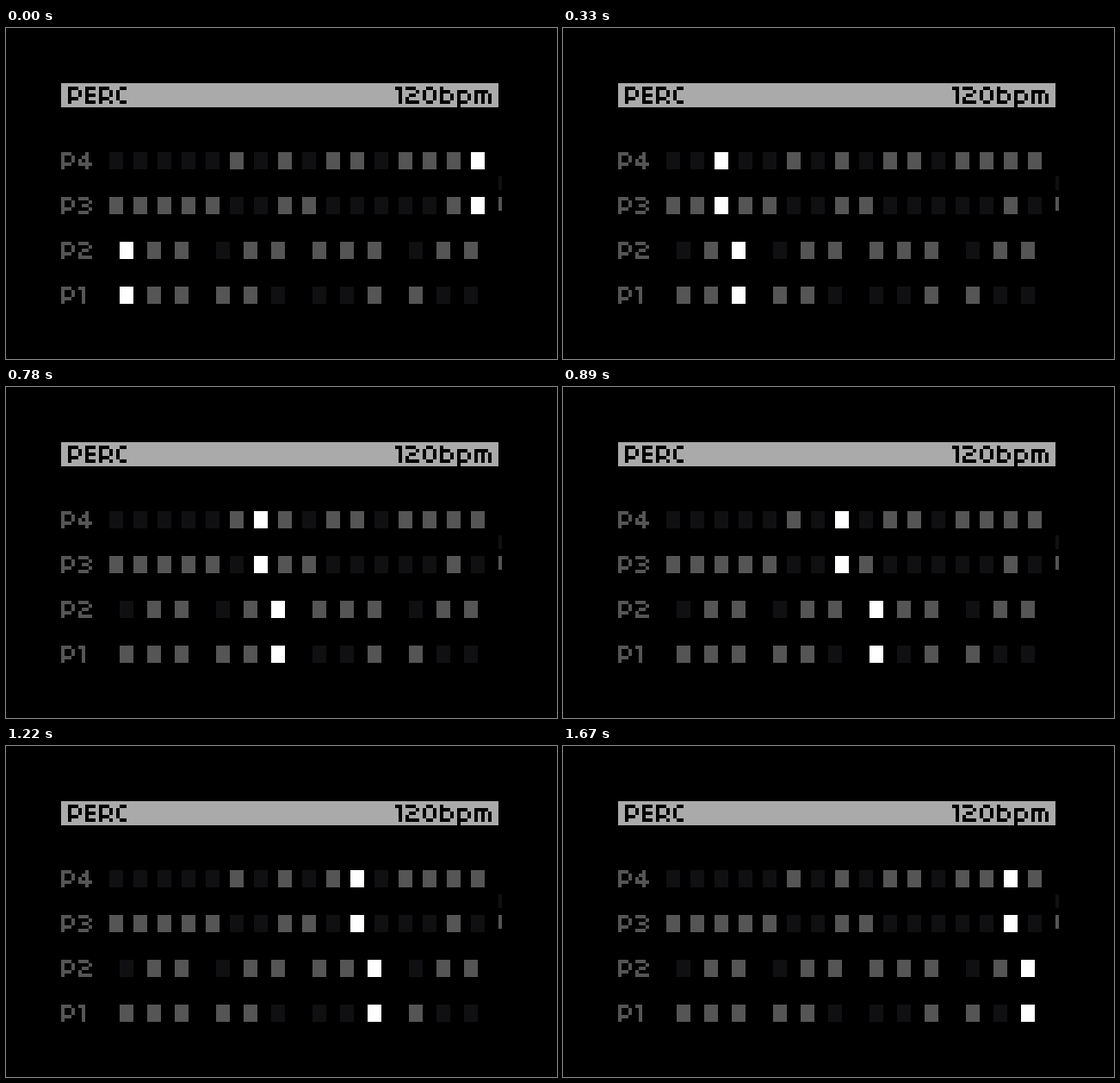
These frames come from a looping animation (640x384 px, 1.78 s). An HTML page with a canvas:

```html
<!DOCTYPE html>
<html lang="en">
<meta charset="utf-8">
<title>Step sequencer</title>
<style>
  html, body { margin: 0; width: 100%; height: 100%; overflow: hidden; background: #000; }
  canvas { display: block; }
</style>
<canvas width="640" height="384" role="img" aria-label="PERC 120bpm, tracks P4 P3 P2 P1"></canvas>
<script>
const ctx = document.querySelector('canvas').getContext('2d');
const PX = 4, LOOP = 1780, HALF = LOOP / 2;
const ON = '#555', OFF = '#101013', LIT = '#fff', BAR = '#aaa';

// Pixel lettering: [width, strokes through pixel centres]
const glyphs = {
  P: [4, 'M0 4V0H2M3 1V2M0 3H2'],
  E: [3, 'M2 0H0V4H2M0 2H2'],
  R: [4, 'M0 4V0H2M3 1V2M0 3H2M3 4h.001'],
  C: [3, 'M2 0H1M0 1V3M1 4H2'],
  0: [4, 'M1 0H2M3 1V3M2 4H1M0 3V1'],
  1: [2, 'M0 0H1V4'],
  2: [4, 'M0 0H2M3 1h.001M2 2H1M0 3V4H3'],
  3: [4, 'M0 0H2M3 1h.001M2 2H1M3 3h.001M2 4H0'],
  4: [4, 'M2 4V0M1 1h.001M0 2V3H3'],
  b: [4, 'M0 0V4H2M0 1H2M3 2V3'],
  p: [4, 'M0 5V1H2M3 2V3M0 4H2'],
  m: [5, 'M0 4V1H3M2 1V4M4 2V4']
};

const straight = i => 120 + 28 * i;
const triplet = i => 132 + 32 * i + 16 * Math.floor(i / 3);
const rows = [
  { name: 'P4', y: 144, cells: '0000010101101111', x: straight },
  { name: 'P3', y: 196, cells: '1111100110000010', x: straight },
  { name: 'P2', y: 248, cells: '011011111011', x: triplet },
  { name: 'P1', y: 300, cells: '111110001100', x: triplet }
];

function rect(color, x, y, w, h) {
  ctx.fillStyle = color;
  ctx.fillRect(x, y, w, h);
}

function text(string, x, y, color) {
  ctx.strokeStyle = color;
  ctx.lineCap = 'square';
  for (const char of string) {
    const [width, strokes] = glyphs[char];
    ctx.save();
    ctx.translate(x + PX / 2, y + PX / 2);
    ctx.scale(PX, PX);
    ctx.stroke(new Path2D(strokes));
    ctx.restore();
    x += (width + 1) * PX;
  }
}

// Eight steps of 110 ms per half loop; the fifth lasts 120 ms
function stepAt(time) {
  const t = time % HALF;
  const step = t < 440 ? t / 110 : t < 560 ? 4 : (t - 10) / 110;
  return 8 * Math.floor(time / HALF) + Math.floor(step);
}

function draw(time) {
  const position = (stepAt(time) + 15) % 16;
  rect('#000', 0, 0, 640, 384);
  rect(BAR, 64, 64, 508, 28);
  text('PERC', 72, 68, '#000');
  text('120bpm', 452, 68, '#000');
  rect(OFF, 572, 172, 4, 16);
  rect(ON, 572, 196, 4, 16);

  for (const { name, y, cells, x } of rows) {
    const count = cells.length;
    const head = Math.ceil(position * count / 16) % count;
    text(name, 64, y, ON);
    [...cells].forEach((cell, i) =>
      rect(i === head ? LIT : cell === '1' ? ON : OFF, x(i), y, 16, 20));
  }
}

function tick() {
  draw(performance.now() % LOOP);
  requestAnimationFrame(tick);
}
tick();
</script>
</html>
```
